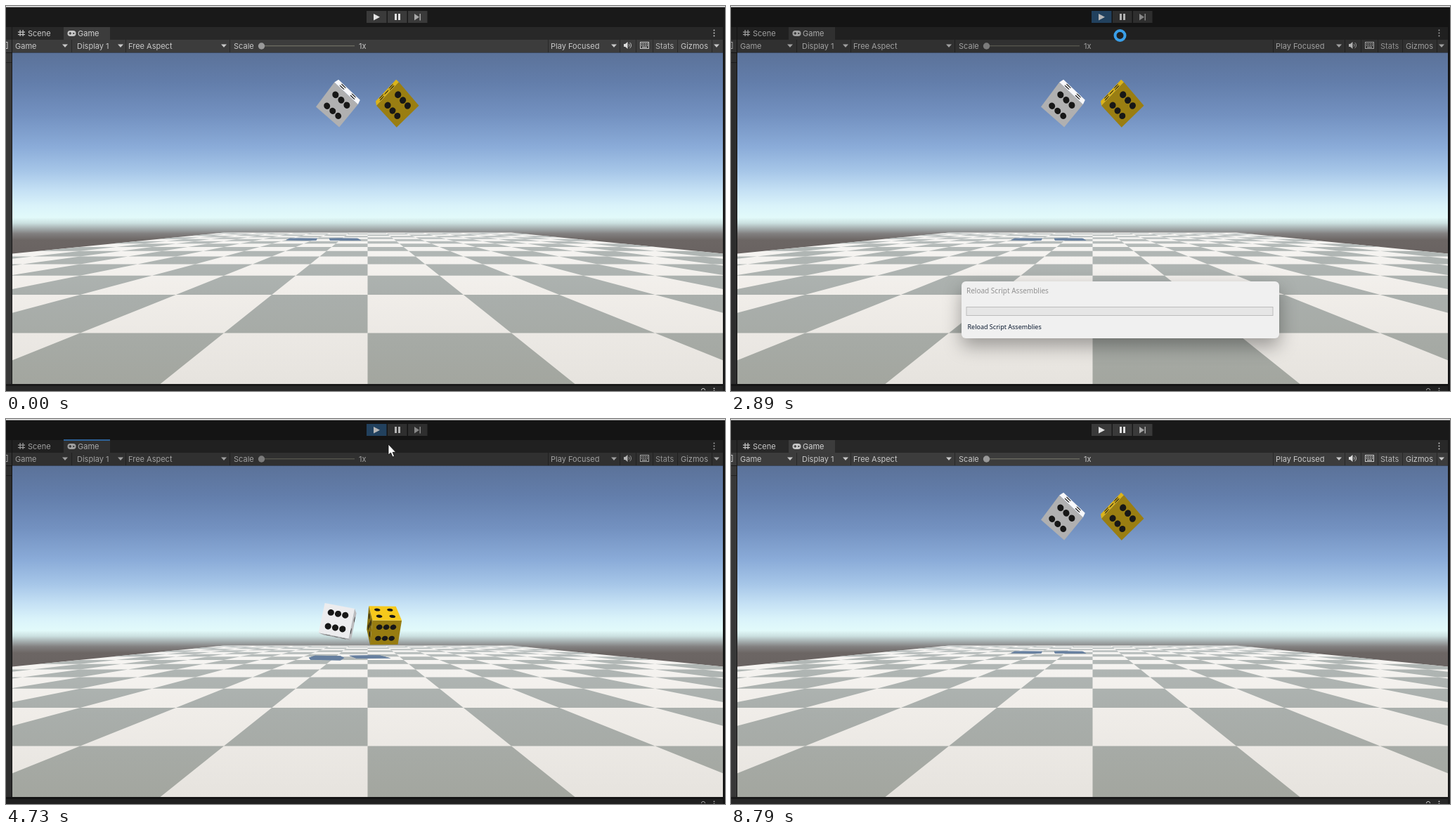
Recreate the animation shown at these times as an HTML page with a canvas. Size 1023 px wide and 548 px high, loop 9260 ms.

```html
<!DOCTYPE html>
<html lang="en">
<head>
<meta charset="utf-8">
<title>Dice drop</title>
<style>
html, body { margin: 0; width: 100%; height: 100%; overflow: hidden; background: #191919; }
canvas { display: block; }
</style>
</head>
<body>
<canvas id="stage" width="1023" height="548"></canvas>
<script>
const g = document.getElementById('stage').getContext('2d');
const LOOP = 9260, CLICK = 1260, DIALOG = 1480, START = 3170, STOP = 7590;
const FOCAL = 409, CX = 514.5, CY = 302, GRAVITY = 9.81, IMPACT = START + 919;

// ---------- helpers ----------
function box(x, y, w, h, color) {
  g.fillStyle = color;
  g.fillRect(x, y, w, h);
}
function poly(points, color) {
  g.beginPath();
  points.forEach(p => g.lineTo(p[0], p[1]));
  g.closePath();
  g.fillStyle = color;
  g.fill();
}
function dot(x, y, r, color) {
  g.beginPath();
  g.arc(x, y, r, 0, 7);
  g.fillStyle = color;
  g.fill();
}
function text(str, x, y, color = '#c8c8c8', font = '11px Inter, sans-serif') {
  g.font = font;
  g.fillStyle = color;
  g.fillText(str, x, y);
}
function gradient(y0, y1, stops) {
  const grad = g.createLinearGradient(0, y0, 0, y1);
  stops.forEach(([y, color]) => grad.addColorStop((y - y0) / (y1 - y0), color));
  return grad;
}
const smooth = k => k * k * (3 - 2 * k);
// keys: rows of [time, ...values]
function track(keys, t, ease = k => k) {
  if (t <= keys[0][0]) return keys[0].slice(1);
  const i = keys.findIndex(k => k[0] > t);
  if (i < 0) return keys[keys.length - 1].slice(1);
  const a = keys[i - 1], b = keys[i], k = ease((t - a[0]) / (b[0] - a[0]));
  return a.slice(1).map((v, j) => v + (b[j + 1] - v) * k);
}
const project = ([x, y, z]) => [CX + FOCAL * x / z, CY - FOCAL * (y - 1) / z];

// ---------- editor window ----------
function chrome(playing, focused) {
  const icon = '#c8c8c8';
  box(0, 0, 1023, 548, '#191919');
  [513, 543, 572].forEach((x, i) => box(x, 7, i ? 27.5 : 28.5, 17, playing && !i ? '#2a5176' : '#3a3a3a'));
  poly([[523, 11], [532, 15.7], [523, 20.5]], '#e4e4e4');
  box(553, 11, 3, 9, '#e0e0e0');
  box(558, 11, 3, 9, '#e0e0e0');
  poly([[581, 11], [588, 15.7], [581, 20.5]], '#a8a8a8');
  box(588.5, 11, 1.5, 9.5, '#a8a8a8');

  box(0, 30, 8, 18, '#282828');
  box(9, 30, 1011, 18, '#282828');
  box(82, 30, 66, 18, '#3c3c3c');
  if (focused) box(82, 29, 66, 2, '#3a79bb');
  [19.5, 23.5].forEach(x => box(x, 34, 1.2, 9, icon));
  [36.5, 40].forEach(y => box(17, y, 10, 1.2, icon));
  text('Scene', 31, 43);
  g.beginPath();
  g.roundRect(87.5, 35, 12, 8, 4);
  g.fillStyle = icon;
  g.fill();
  box(89.5, 38.3, 3.6, 1.2, '#333');
  box(90.7, 37.1, 1.2, 3.6, '#333');
  dot(96.3, 39, 1.1, '#333');
  text('Game', 102, 43, '#d4d4d4');

  box(0, 48, 8, 18, '#3c3c3c');
  box(0, 67, 8, 471, '#383838');
  box(0, 80, 8, 1, '#232323');
  box(0, 51, 2, 1, icon);
  box(0, 60, 2, 1, icon);
  box(1.5, 51, 1, 10, icon);
  box(9, 48, 1011, 18, '#3c3c3c');
  [93, 170, 318, 771, 873, 896, 920, 955, 1004].forEach(x => box(x, 48, 1, 18, '#282828'));
  [84, 163, 310, 865, 1011].forEach(x => poly([[x - 4, 54.5], [x + 4, 54.5], [x, 59]], icon));
  text('Game', 13, 60.5);
  text('Display 1', 101, 60.5);
  text('Free Aspect', 174, 60.5);
  text('Scale', 324, 60.5);
  box(363, 56, 133, 1.4, '#69695f');
  dot(363.5, 57, 4.7, '#999');
  text('1x', 502, 60.5);
  text('Play Focused', 775, 60.5);
  text('Stats', 924, 60.5, '#b4b4b4');
  text('Gizmos', 960, 60.5);
  poly([[879, 54], [881, 54], [884.5, 51], [884.5, 61], [881, 58], [879, 58]], '#ddd');
  g.strokeStyle = '#ccc';
  g.lineWidth = 1;
  [2.5, 5].forEach(r => {
    g.beginPath();
    g.arc(884.5, 56, r, -0.9, 0.9);
    g.stroke();
  });
  g.strokeRect(902.5, 51.5, 12, 9);
  for (let r = 0; r < 2; r++) for (let c = 0; c < 4; c++) box(904 + c * 2.6, 53 + r * 2.5, 1.5, 1.4, '#ccc');
  box(905, 58, 7, 1.2, '#ccc');

  box(0, 541, 1020, 7, '#282828');
  [34.5, 38.5, 42.5].forEach(y => dot(1007.5, y, 1, icon));
  [544.5, 548].forEach(y => dot(1007.5, y, 1, icon));
  g.strokeStyle = icon;
  g.beginPath();
  g.arc(992, 547, 2.6, Math.PI, 0);
  g.stroke();

  if (playing) box(0, 2, 1023, 546, 'rgba(0,0,0,.2)');
  box(0, 0, 1023, 1.6, '#ececec');
}

// ---------- scene ----------
function scenery() {
  box(9, 66, 1011, 472, gradient(66, 360, [
    [66, '#5b7299'], [110, '#637eab'], [155, '#7391c0'], [200, '#8aabd8'], [235, '#a6c6e8'],
    [262, '#c4e0f4'], [285, '#daf3fa'], [301, '#e2fafa'], [309, '#cbe0e0'],
    [316, '#a8b2b3'], [324, '#828080'], [333, '#6c6664'], [360, '#686160']
  ]));
  const light = gradient(322, 538, [[322, '#f7f6f4'], [400, '#f1eeea'], [538, '#e6e3de']]);
  const dark = gradient(322, 538, [[322, '#bcc2c2'], [350, '#b0b6b4'], [420, '#a9aeab'], [538, '#a3a69f']]);
  const tile = 1.25;
  const floor = (x0, x1, z0, z1, color) =>
    poly([[x0, z0], [x1, z0], [x1, z1], [x0, z1]].map(([x, z]) => project([x, 0, z])), color);
  floor(-10, 10, 0.5, 20, light);
  for (let row = 0; row < 16; row++)
    for (let col = -8; col < 8; col++)
      if ((row + col) & 1)
        floor(col * tile, (col + 1) * tile, Math.max(row * tile, 0.5), (row + 1) * tile, dark);
}

// position x and z, then pitch, yaw and roll in degrees
const dice = [
  { base: [248, 248, 250], ambient: 0.67, diffuse: 0.46, lift: 3.83, hop: 2.4, path: [
    [IMPACT, -1, 10, 30, 3, -43], [4730, -1, 9.87, -5, 1, -11],
    [4960, -1, 9.8, 0, 1, 0], [5710, -1, 9.8, 0, 1, 0], [6500, -1.08, 9.8, 0, 1, 0]] },
  { base: [246, 201, 28], ambient: 0.55, diffuse: 0.78, lift: 3.7, hop: 1.3, path: [
    [IMPACT, 1, 10, 30, 0, -45], [4730, 0.56, 10.3, 33, -8, 0],
    [5000, 0.44, 10.47, 0, -6.5, 0]] }
];

function height(die, t) {
  if (t < START) return 5;
  if (t < IMPACT) return 5 - GRAVITY / 2 * ((t - START) / 1000) ** 2;
  const s = (t - IMPACT) / 1000;
  const land = (die.lift + Math.sqrt(die.lift ** 2 + 2 * GRAVITY * 0.36)) / GRAVITY;
  if (s < land) return 0.86 + die.lift * s - GRAVITY / 2 * s * s;
  return 0.5 + Math.max(0, die.hop * (s - land) - GRAVITY / 2 * (s - land) ** 2);
}

const turn = (a, b, angle) => [
  a * Math.cos(angle) - b * Math.sin(angle),
  a * Math.sin(angle) + b * Math.cos(angle)];
function rotate([x, y, z], [pitch, yaw, roll]) {
  [x, y] = turn(x, y, roll);
  [z, y] = turn(z, y, pitch);
  [z, x] = turn(z, x, yaw);
  return [x, y, z];
}

const diag = [[-.23, -.23], [.23, .23]], cross = [[-.23, .23], [.23, -.23]];
const four = [...diag, ...cross];
const six = [-.24, 0, .24].flatMap(u => [[u, -.23], [u, .23]]);
// each face: local point for (u, v) and its pips
const faces = [
  [(u, v) => [u, v, -.5], six],
  [(u, v) => [u, v, .5], [[0, 0]]],
  [(u, v) => [u, .5, v], four],
  [(u, v) => [u, -.5, v], [[0, 0], ...diag]],
  [(u, v) => [-.5, u, v], [[0, 0], ...four]],
  [(u, v) => [.5, u, v], diag]
];
const corners = [[-.5, -.5], [.5, -.5], [.5, .5], [-.5, .5]];
const sun = [.32, .77, -.557];
const dotProduct = (a, b) => a[0] * b[0] + a[1] * b[1] + a[2] * b[2];

function placed(die, t) {
  const [x, z, ...degrees] = track(die.path, t);
  const y = height(die, t), angles = degrees.map(d => d * Math.PI / 180);
  return {
    spin: p => rotate(p, angles),
    world: p => rotate(p, angles).map((v, i) => v + [x, y, z][i])
  };
}
function drawShadow({ world }) {
  faces.forEach(([at]) => poly(corners.map(c => {
    const [x, y, z] = world(at(...c));
    return project([x - .42 * y, 0, z + .727 * y]);
  }), '#667f9f'));
}
function drawDie(die, { spin, world }) {
  faces.forEach(([at, pips]) => {
    const center = at(0, 0), normal = spin(center.map(v => v * 2)), [x, y, z] = world(center);
    if (dotProduct(normal, [x, y - 1, z]) >= 0) return;
    const shade = Math.min(1, die.ambient + die.diffuse * Math.max(0, dotProduct(normal, sun)));
    poly(corners.map(c => project(world(at(...c)))), `rgb(${die.base.map(v => Math.round(v * shade))})`);
    pips.forEach(([u, v]) => {
      const rim = Array.from({ length: 16 }, (_, i) => {
        const a = i * Math.PI / 8;
        return project(world(at(u + .105 * Math.cos(a), v + .105 * Math.sin(a))));
      });
      poly(rim, '#171717');
    });
  });
}

// ---------- overlays ----------
function dialog() {
  g.save();
  g.shadowColor = 'rgba(0,0,0,.35)';
  g.shadowBlur = 26;
  g.shadowOffsetY = 11;
  g.beginPath();
  g.roundRect(328, 392, 452, 81, 6);
  g.fillStyle = '#f0f0f0';
  g.fill();
  g.restore();
  text('Reload Script Assemblies', 335, 408.5, '#929292', '10px "Noto Sans", sans-serif');
  text('Reload Script Assemblies', 336.5, 459.5, '#0b1a30', '9px "Noto Sans", sans-serif');
  box(334.5, 428, 437, 13, '#bcbcbc');
  box(335.5, 429, 435, 11, '#e6e6e6');
}

const mouse = [
  [270, 932, 523], [1090, 523, 13], [1300, 523, 13], [1600, 546, 34], [1800, 546, 34], [2140, 553, 42],
  [3100, 553, 42], [3400, 559, 42], [3900, 559, 42], [4700, 544, 36], [5200, 544, 36], [5600, 540, 35],
  [6200, 540, 35], [6900, 521, 19], [8150, 521, 19], [8790, 1012, 532]
];
const arrow = [[0, 0], [0, 15], [3.5, 12], [6, 18], [8.5, 17], [6.1, 11.3], [10.6, 11.3]];
function pointer(t) {
  if (t < 270 || t >= 8790) return;
  const [x, y] = track(mouse, t, smooth);
  if (t > 1400 && t < START) {
    g.beginPath();
    g.arc(x + .5, y, 7, 0, 7);
    g.strokeStyle = '#3a9fe8';
    g.lineWidth = 4;
    g.stroke();
    return;
  }
  poly(arrow.map(p => [p[0] + x, p[1] + y]), '#fff');
  g.strokeStyle = '#111';
  g.lineWidth = .8;
  g.stroke();
}

function draw(t) {
  const playing = t >= CLICK && t < STOP;
  chrome(playing, t >= START && t < STOP);
  g.save();
  g.beginPath();
  g.rect(9, 66.5, 1011, 471.5);
  g.clip();
  scenery();
  const poses = dice.map(die => placed(die, t < STOP ? t : 0));
  poses.forEach(drawShadow);
  dice.forEach((die, i) => drawDie(die, poses[i]));
  g.restore();
  if (t >= DIALOG && t < START) dialog();
  pointer(t);
}

const begin = performance.now();
function tick() {
  draw((performance.now() - begin) % LOOP);
  requestAnimationFrame(tick);
}
tick();
</script>
</body>
</html>
```
